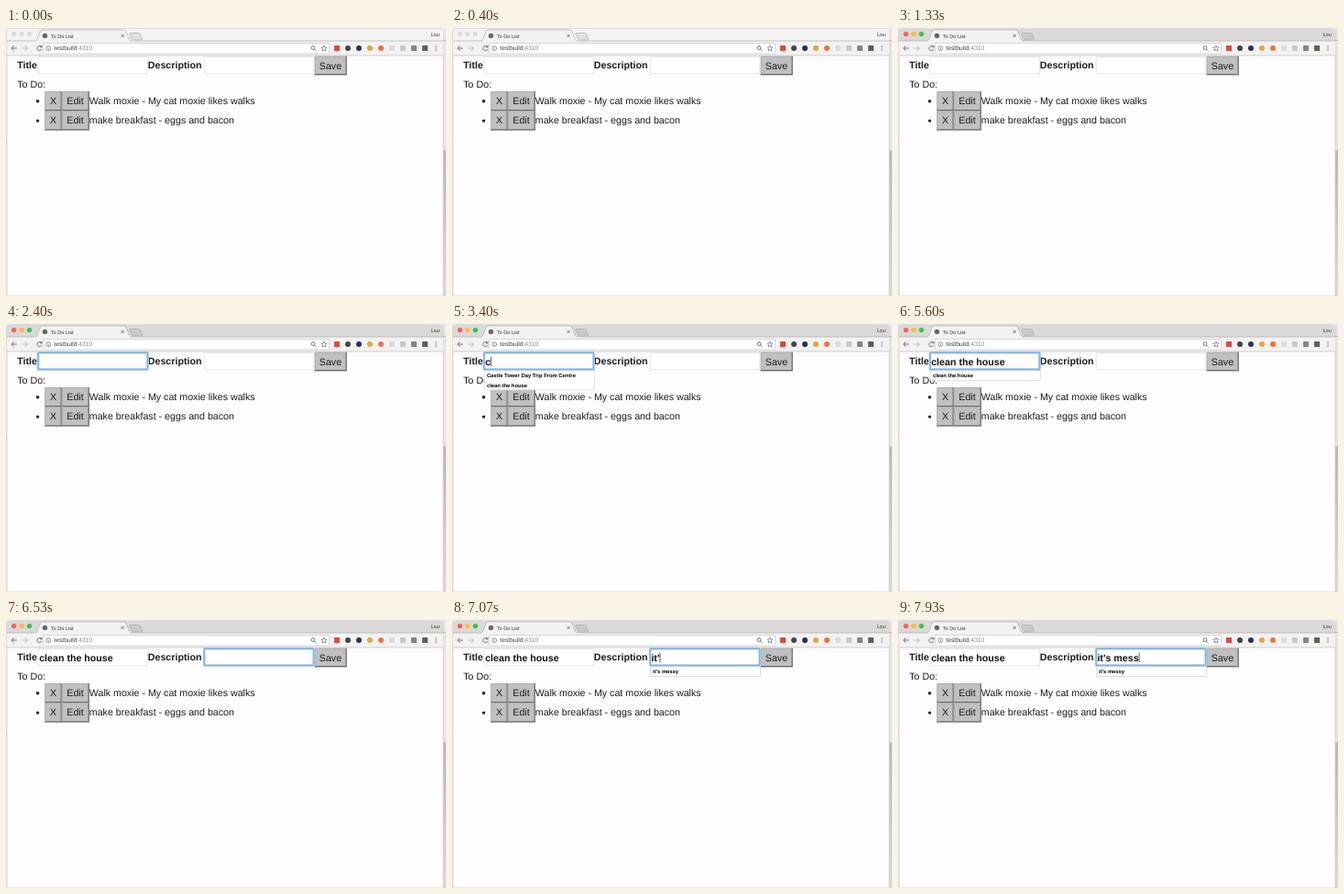
Animation of 480 by 292 pixels, one loop 8 s. Source, as an HTML page:

```html
<!DOCTYPE html>
<html lang="en">
<head>
<meta charset="utf-8">
<title>To Do List</title>
<style>
  html, body { margin: 0; width: 100%; height: 100%; overflow: hidden; background: #e6e6e6; }
  svg { display: block; width: 480px; height: 292px; }
  text {
    font: 10.67px "Liberation Sans", Arial, sans-serif;
    fill: #1c1c1c; white-space: pre; text-rendering: geometricPrecision;
  }
  .b { font-weight: bold; }
  .typed { font-weight: bold; fill: #111; }
  .hint { font-size: 5.85px; font-weight: bold; fill: #000; }
  .ui { font-size: 5.6px; fill: #333; }
  .url { font-size: 6.75px; fill: #3c3c3c; }
  .port { fill: #888; }
  .line { fill: none; stroke: #666; stroke-width: .9; }
</style>
</head>
<body>
<svg id="stage" viewBox="0 0 480 292">
  <defs>
    <linearGradient id="shade" x2="0" y2="1">
      <stop stop-color="#b8b8b8"/><stop offset="1" stop-color="#dadada"/>
    </linearGradient>
  </defs>
  <rect width="480" height="292" fill="#e6e6e6"/>
  <rect x="477" y="133" width="3" height="159" fill="url(#shade)"/>
  <path d="M477 13.5h3M0 124.5h1" stroke="#bbb"/>
  <path d="M1 292V4q0-3 3-3h470q3 0 3 3v288z" fill="#fefdfe" stroke="#c4c4c4" stroke-width=".6"/>

  <!-- browser frame -->
  <path id="strip" d="M1 14V3q0-2 2-2h472q2 0 2 2v11z"/>
  <g id="lights"></g>
  <path id="newTab" d="M135.5 5.5h9q1.5 0 2 1.2l2 5q.5 1.3-1 1.3h-8q-1.5 0-2-1.2l-2.3-5q-.4-1.3.3-1.3z" stroke="#a5a5a5" stroke-width=".6"/>
  <rect x="1" y="14" width="476" height="16" fill="#f3f2f3"/>
  <path d="M1 14H31q2 0 2.600-1.500l3.400-8.500q.8-2 2.500-2h89q1.700 0 2.500 2l3.400 8.500q.6 1.500 2.600 1.500H477" fill="#f3f2f3" stroke="#adadad" stroke-width=".7"/>
  <rect x="34" y="13.5" width="101" height="2" fill="#f3f2f3"/>
  <path d="M1 30H477" stroke="#c3c3c3" stroke-width=".8"/>
  <circle cx="42.5" cy="8.4" r="2.7" fill="#666"/>
  <text class="ui" x="48.8" y="10.5">To Do List</text>
  <path class="line" d="M125.5 6.8l3.2 3.2m0-3.2l-3.2 3.2"/>
  <text class="ui" x="463.5" y="8.5">Lou</text>

  <path class="line" d="M12 22H6m2.700-2.800L6 22l2.700 2.800"/>
  <path class="line" d="M17.500 22h6m-2.700-2.800l2.700 2.800l-2.700 2.800" style="stroke:#b5b5b5"/>
  <path class="line" d="M38.800 20.800a2.600 2.600 0 1 0 .2 2M39 18.900v2h-2"/>
  <rect x="40.5" y="16.5" width="312" height="11.5" rx="1.5" fill="#fff" stroke="#c8c8c8" stroke-width=".7"/>
  <circle class="line" cx="46.3" cy="22.2" r="2.4" style="stroke-width:.7"/>
  <path class="line" d="M46.300 21.800v1.800M46.300 20.500v.6" style="stroke-width:.7"/>
  <text class="url" x="52.3" y="24.400">testbuild<tspan class="port">:4310</tspan></text>
  <circle class="line" cx="335" cy="21.6" r="1.9"/>
  <path class="line" d="M336.400 23l2.200 2.200"/>
  <path class="line" d="M347 19l.9 2.100 2.200.2-1.700 1.500.5 2.200-1.900-1.200-1.900 1.200.5-2.200-1.700-1.500 2.200-.2z" style="stroke-width:.7"/>
  <g id="icons"></g>
  <path d="M469 19.200v1.200m0 1v1.200m0 1v1.200" stroke="#666" stroke-width="1.2"/>

  <!-- page -->
  <text class="b" x="12.3" y="44.4">Title</text>
  <text class="b" x="154.8" y="44.4">Description</text>
  <text x="12.3" y="65.2">To Do:</text>
  <g id="page"></g>
  <g id="form"></g>
</svg>
<script>
const LOOP = 8000, ACTIVE = 1330;
const $ = id => document.getElementById(id);

function add(parent, tag, attrs, text) {
  const el = document.createElementNS("http://www.w3.org/2000/svg", tag);
  for (const k in attrs) el.setAttribute(k, attrs[k]);
  if (text !== undefined) el.textContent = text;
  return parent.appendChild(el);
}
const show = (el, on) => el.setAttribute("visibility", on ? "visible" : "hidden");

function button(x, y, w, h, label, tx, ty) {
  const g = $("page");
  add(g, "rect", { x, y, width: w, height: h, fill: "#c0c0c0" });
  add(g, "path", { d: `M${x + .5} ${y + h}V${y + .5}H${x + w}`, fill: "none", stroke: "#adadad" });
  add(g, "path", { d: `M${x} ${y + h - .6}H${x + w - .6}V${y}`, fill: "none", stroke: "#696969", "stroke-width": 1.2 });
  add(g, "text", { x: tx, y: ty }, label);
}

// Toolbar extension badges: x, colour, round
[[361, "#e0483f", 0], [373, "#444", 1], [385, "#2b3150", 1], [397, "#e3a43c", 1], [409, "#ec7440", 1],
 [421, "#dcdcdc", 0], [433, "#c9c9c9", 0], [445, "#858585", 0], [457, "#5b6350", 0]]
  .forEach(([x, fill, round]) => add($("icons"), "rect",
    { x: x - 3, y: 19, width: 6, height: 6, rx: round ? 3 : .6, fill }));

const lightColors = ["#f9605a", "#fbbb3f", "#35c64b"];
const lights = [8.7, 17.1, 25.5].map(cx => add($("lights"), "circle", { cx, cy: 6.6, r: 2.7 }));

button(336.7, 30.7, 35, 20.6, "Save", 341.8, 44.5);
["Walk moxie - My cat moxie likes walks", "make breakfast - eggs and bacon"].forEach((item, i) => {
  const y = 69 + i * 21.3, base = y + 13.9;
  add($("page"), "circle", { cx: 34.6, cy: y + 10.8, r: 1.7, fill: "#1c1c1c" });
  button(42.4, y, 18.4, 21.2, "X", 48.1, base);
  button(60.8, y, 30, 21.2, "Edit", 66.3, base);
  add($("page"), "text", { x: 90.8, y: base }, item);
});

function makeField(x, value, focus, blur, keys, hints) {
  const g = $("form");
  add(g, "rect", { x, y: 31.3, width: 119.6, height: 18.4, fill: "#fff", stroke: "#e2e2e2", "stroke-width": .8 });
  const list = add(g, "g", {});
  const box = add(list, "rect", { x: x + .2, y: 50.5, width: 120, fill: "#fff", stroke: "#d4d4d4", "stroke-width": .7 });
  const rows = [0, 1].map(i => add(list, "text", { class: "hint", x: x + 2.9, y: 58.3 + i * 10.4 }));
  const ring = add(g, "g", {});
  const edge = { x, y: 31.2, width: 119.5, height: 18.3, rx: 1, fill: "none" };
  add(ring, "rect", { ...edge, stroke: "#c3dcf5", "stroke-width": 3 });
  add(ring, "rect", { ...edge, stroke: "#82b3e8", "stroke-width": 1.7 });
  const text = add(g, "text", { class: "typed", x: x + 1.2, y: 44.5 });
  const caret = add(g, "rect", { y: 35.7, width: .8, height: 10.5, fill: "#333" });

  return t => {
    const n = keys.filter(k => k <= t).length;
    const typed = value.slice(0, n);
    const focused = t >= focus && t < blur;
    const found = focused && n ? hints.filter(h => h.toLowerCase().startsWith(typed)) : [];
    text.textContent = typed;
    show(ring, focused);
    show(list, found.length > 0);
    box.setAttribute("height", found.length * 10.5 + .4);
    rows.forEach((row, i) => row.textContent = found[i] || "");
    const since = t - (n ? keys[n - 1] : focus);
    show(caret, focused && since % 1000 < 500);
    caret.setAttribute("x", x + 1.3 + (n ? text.getComputedTextLength() : 0));
  };
}

const fields = [
  makeField(35, "clean the house", 1870, 5870,
    [3270, 3470, 3600, 3730, 3870, 4000, 4130, 4270, 4330, 4470, 4530, 4670, 4730, 4800, 4900],
    ["Castle Tower Day Trip From Centre", "clean the house"]),
  makeField(216.2, "it's mess", 5870, LOOP,
    [6730, 6870, 7000, 7130, 7270, 7470, 7600, 7730, 7900],
    ["it's messy"])
];

function draw(t) {
  const active = t >= ACTIVE;
  $("strip").setAttribute("fill", active ? "#dbd9d8" : "#f4f3f4");
  $("newTab").setAttribute("fill", active ? "#cbc9c9" : "#e0e0e0");
  lights.forEach((l, i) => l.setAttribute("fill", active ? lightColors[i] : "#dadada"));
  fields.forEach(f => f(t));
}

const start = performance.now();
function tick() {
  draw((performance.now() - start) % LOOP);
  requestAnimationFrame(tick);
}
tick();
</script>
</body>
</html>
```
